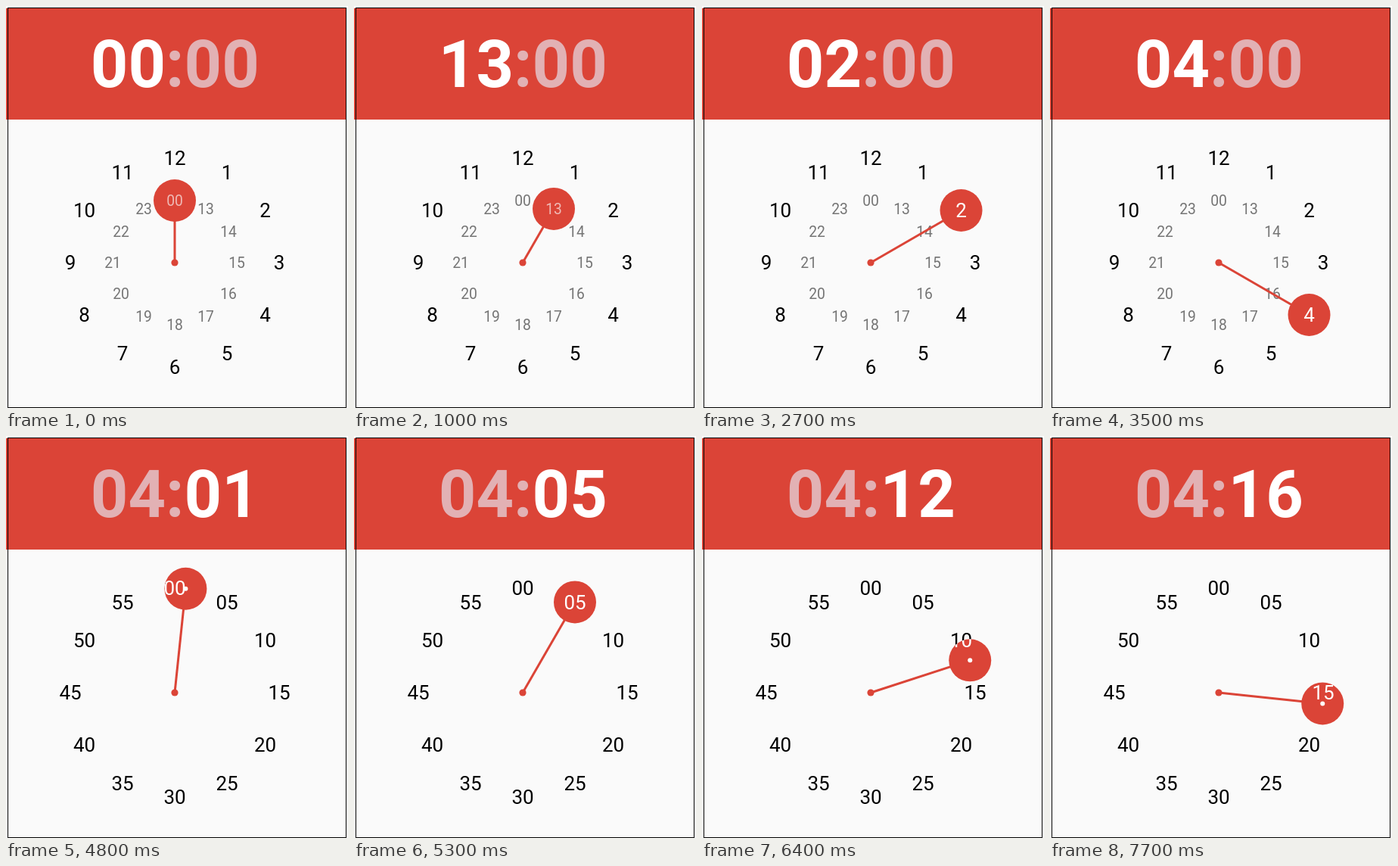
These frames come from a looping animation (452 px wide and 531 px high, 7800 ms). An HTML page with a canvas:

```html
<!DOCTYPE html>
<html lang="en">
<meta charset="utf-8">
<title>Time picker</title>
<style>
  html, body { margin: 0; width: 452px; height: 531px; overflow: hidden; background: #fff; }
  canvas { display: block; }
</style>
<canvas id="stage" width="452" height="531"></canvas>
<script>
const ctx = document.getElementById('stage').getContext('2d');
const LOOP = 7800, CX = 223, CY = 339, OUTER = 138, INNER = 82, KNOB = 28;
const RED = '#db4437', DIM = '#e2b1b4';

// Start times of each selected hour, then of each selected minute from 0 to 16
const hours = [[0, 0], [1000, 13], [1200, 14], [1500, 15], [2100, 1], [2700, 2], [3100, 3], [3500, 4]];
const minuteStarts = [4200, 4800, 4900, 5000, 5100, 5300, 5400, 5500, 5700, 5900,
  6100, 6200, 6400, 6500, 6600, 6700, 6800];

const pad = n => String(n).padStart(2, '0');

function polar(turn, radius) {
  const a = turn * 2 * Math.PI;
  return [CX + radius * Math.sin(a), CY - radius * Math.cos(a)];
}

function label(text, x, y, size, color, weight = 400) {
  ctx.font = `${weight} ${size}px Roboto, sans-serif`;
  ctx.fillStyle = color;
  ctx.fillText(text, x, y + size * 0.3555);
}

function disc(x, y, r, color) {
  ctx.fillStyle = color;
  ctx.beginPath();
  ctx.arc(x, y, r, 0, 2 * Math.PI);
  ctx.fill();
}

function numbers(minuteMode, outerColor, innerColor) {
  for (let i = 0; i < 12; i++) {
    const [x, y] = polar(i / 12, OUTER);
    label(minuteMode ? pad(i * 5) : i || 12, x, y, 26, outerColor);
    if (!minuteMode) {
      const [ix, iy] = polar(i / 12, INNER);
      label(i ? i + 12 : '00', ix, iy, 19.3, innerColor);
    }
  }
}

function header(hour, minute, minuteMode) {
  ctx.fillStyle = RED;
  ctx.fillRect(0, 3, 450, 147);
  label(pad(hour), 161.5, 76, 86.5, minuteMode ? DIM : '#fff', 700);
  label(':', 223.3, 76, 86.5, DIM, 700);
  label(pad(minute), 285.2, 76, 86.5, minuteMode ? '#fff' : DIM, 700);
}

function dial(turn, radius, minuteMode, showDot) {
  const [x, y] = polar(turn, radius);
  numbers(minuteMode, '#000', '#757575');
  ctx.strokeStyle = RED;
  ctx.lineWidth = 3;
  ctx.beginPath();
  ctx.moveTo(CX, CY);
  ctx.lineTo(x, y);
  ctx.stroke();
  disc(CX, CY, 4.6, RED);
  disc(x, y, KNOB, RED);

  // Numbers turn light only where the knob covers them
  ctx.save();
  ctx.beginPath();
  ctx.arc(x, y, KNOB, 0, 2 * Math.PI);
  ctx.clip();
  numbers(minuteMode, '#fff', '#efb9b5');
  ctx.restore();
  if (showDot) disc(x, y, 3, '#fff');
}

function draw(now) {
  const t = now % LOOP;
  const hour = hours.filter(([start]) => start <= t).pop()[1];
  const passed = minuteStarts.filter(start => start <= t).length;
  const minuteMode = passed > 0;
  const minute = Math.max(0, passed - 1);

  ctx.fillStyle = '#fff';
  ctx.fillRect(0, 0, 452, 531);
  ctx.fillStyle = '#fafafa';
  ctx.fillRect(2, 3, 448, 528);
  ctx.textAlign = 'center';
  header(hour, minute, minuteMode);

  if (minuteMode) dial(minute / 60, OUTER, true, minute % 5 > 0);
  else dial(hour / 12, hour === 0 || hour > 12 ? INNER : OUTER, false, false);

  ctx.strokeStyle = '#000';
  ctx.lineWidth = 1;
  ctx.strokeRect(2.5, 2.5, 447, 528);
  requestAnimationFrame(() => draw(performance.now()));
}
draw(performance.now());
</script>
</html>
```
